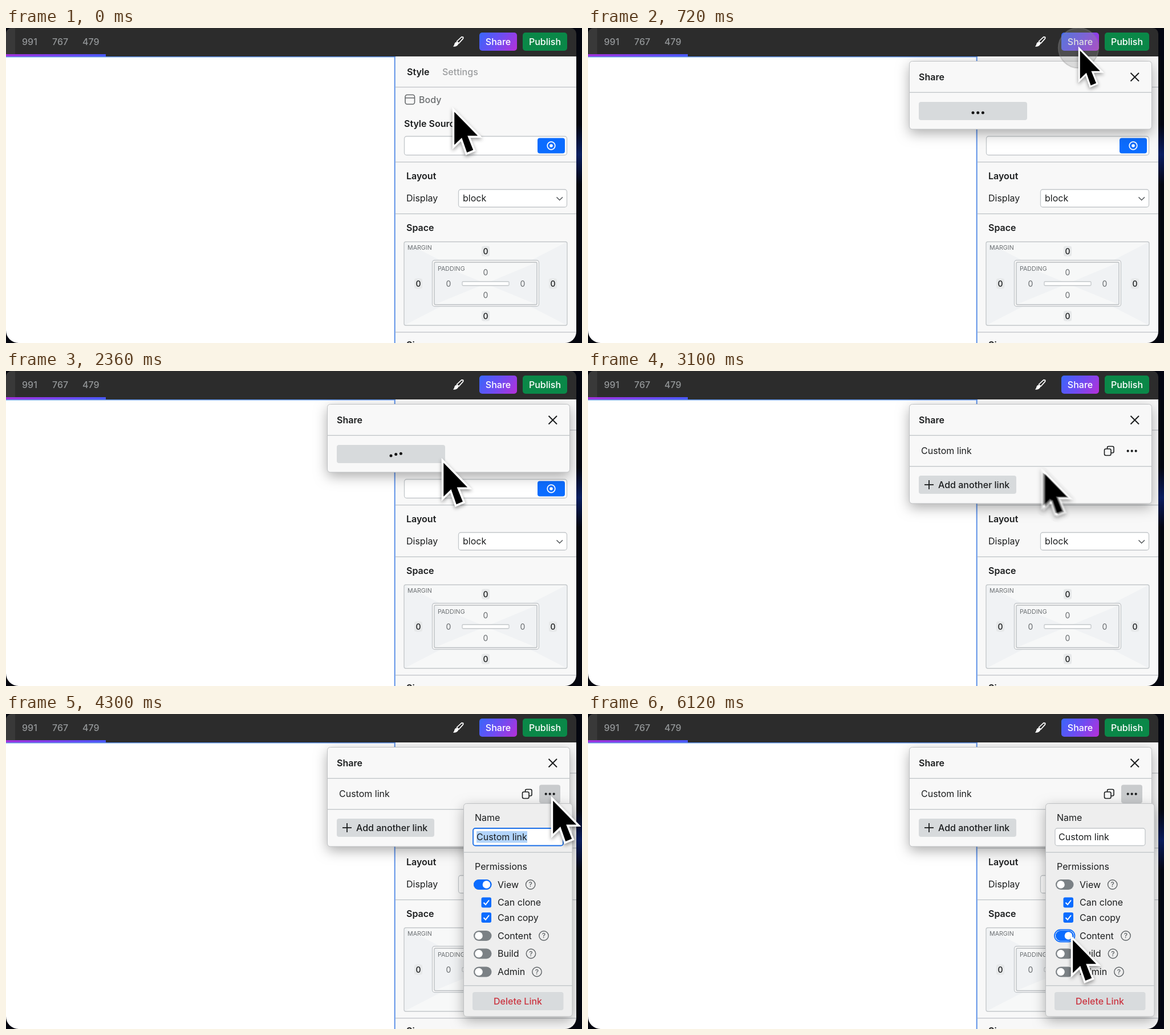
An HTML page with a canvas for the animation above (6.46 s loop, 1010 by 554 pixels).

```html
<!DOCTYPE html>
<html lang="en">
<head>
<meta charset="utf-8">
<title>Share link</title>
<style>
html, body { margin: 0; width: 100%; height: 100%; overflow: hidden; background: #04060f; }
canvas { display: block; width: 1010px; height: 554px; }
</style>
</head>
<body>
<canvas id="stage" width="1010" height="554"></canvas>
<script>
const LOOP = 6460;
const ctx = document.getElementById('stage').getContext('2d');
const layer = document.createElement('canvas');
layer.width = 1010;
layer.height = 554;
const lctx = layer.getContext('2d');

const INK = '#1b1d1e', LINE = '#c3c7ca', BLUE = '#0b6cff', PANEL = '#f8f8f8', BUTTON = '#d7dadc';

const clamp = v => Math.max(0, Math.min(1, v));
const smooth = v => v * v * (3 - 2 * v);
const mix = (a, b, k) => a + (b - a) * k;

// ---------- drawing helpers ----------
function box(x, y, x2, y2, r, fill, stroke, width = 1.3) {
  ctx.beginPath();
  ctx.roundRect(x, y, x2 - x, y2 - y, r);
  if (fill) { ctx.fillStyle = fill; ctx.fill(); }
  if (stroke) { ctx.strokeStyle = stroke; ctx.lineWidth = width; ctx.stroke(); }
}

function rule(x, x2, y) {
  ctx.fillStyle = LINE;
  ctx.fillRect(x, y - 0.7, x2 - x, 1.4);
}

function text(s, x, cy, { color = INK, weight = 400, size = 16, align = 'left' } = {}) {
  ctx.font = `${weight} ${size}px Inter, sans-serif`;
  ctx.textAlign = align;
  ctx.fillStyle = color;
  ctx.fillText(s, x, cy + size * 0.364);
}

function disc(x, y, r, color) {
  ctx.fillStyle = color;
  ctx.beginPath();
  ctx.arc(x, y, r, 0, 7);
  ctx.fill();
}

function ring(x, y, r, color, width) {
  ctx.strokeStyle = color;
  ctx.lineWidth = width;
  ctx.beginPath();
  ctx.arc(x, y, r, 0, 7);
  ctx.stroke();
}

function line(color, width, ...pts) {
  ctx.strokeStyle = color;
  ctx.lineWidth = width;
  ctx.beginPath();
  for (let i = 0; i < pts.length; i += 2) ctx.lineTo(pts[i], pts[i + 1]);
  ctx.stroke();
}

function ramp(x, y, x2, y2, ...colors) {
  const g = ctx.createLinearGradient(x, y, x2, y2);
  colors.forEach((c, i) => g.addColorStop(i / (colors.length - 1), c));
  return g;
}

function card(x, y, x2, y2, fill) {
  ctx.save();
  ctx.shadowColor = 'rgba(0,0,0,.32)';
  ctx.shadowBlur = 22;
  ctx.shadowOffsetY = 7;
  box(x, y, x2, y2, 5, fill);
  ctx.restore();
  box(x, y, x2, y2, 5, null, '#bfc1c3', 1);
}

function plus(x, y) {
  line(INK, 1.8, x - 8, y, x + 8, y);
  line(INK, 1.8, x, y - 8, x, y + 8);
}

// ---------- editor ----------
function topBar() {
  ctx.fillStyle = '#2c2c2c';
  ctx.fillRect(0, 0, 1000, 50);
  ctx.fillStyle = '#393939';
  ctx.fillRect(0, 0, 16, 46);
  const soft = { color: '#929597', weight: 500 };
  text('991', 28, 24, soft);
  text('767', 81, 24, soft);
  text('479', 134, 24, soft);
  ctx.fillStyle = ramp(0, 0, 175, 0, '#a033dc', '#7a42ee', '#4a58fa');
  ctx.fillRect(0, 46, 175, 4.5);

  // brush
  ctx.lineJoin = ctx.lineCap = 'round';
  line('#fff', 1.7, 790.5, 23.5, 799, 15.6, 801.6, 16, 801.6, 18.4, 794, 27, 790.5, 23.5);
  ctx.fillStyle = '#fff';
  ctx.beginPath();
  ctx.moveTo(789.5, 24.5);
  ctx.quadraticCurveTo(794, 25.5, 793, 29);
  ctx.quadraticCurveTo(790, 33.5, 784, 32.5);
  ctx.quadraticCurveTo(786.5, 30.5, 786.3, 28);
  ctx.quadraticCurveTo(787, 25, 789.5, 24.5);
  ctx.fill();
  ctx.lineJoin = 'miter';
  ctx.lineCap = 'butt';

  box(830, 8, 896, 40, 5, ramp(834, 4, 892, 44, '#3a66fb', '#6f4cf2', '#b430d8'));
  text('Share', 863, 24, { color: '#fff', weight: 500, align: 'center' });
  box(906, 8, 984, 40, 5, '#0a8848');
  text('Publish', 945, 24, { color: '#fff', weight: 500, align: 'center' });
}

function wedges(x, y, x2, y2, cx, cy) {
  ctx.fillStyle = '#f0f2f4';
  for (const side of [x, x2]) {
    ctx.beginPath();
    ctx.moveTo(side, y);
    ctx.lineTo(cx, cy);
    ctx.lineTo(side, y2);
    ctx.fill();
  }
}

function spaceBox() {
  box(698, 376, 984, 523, 3, '#f7f8f8');
  wedges(698, 376, 984, 523, 841, 449.5);
  box(698, 376, 984, 523, 3, null, LINE);
  box(747.5, 408.5, 934.5, 489.5, 4, PANEL, LINE);
  box(751, 412, 931, 486.5, 2, '#f7f8f8');
  wedges(751, 412, 931, 486.5, 841, 449.5);
  box(751, 412, 931, 486.5, 2, null, '#b9bdc0');
  box(800, 446, 882, 453, 1.5, '#fff', LINE);
  const tag = { color: '#6b6f72', size: 10.67 };
  text('MARGIN', 704, 386, tag);
  text('PADDING', 757, 423, tag);
  for (const [x, y] of [[841, 392.5], [723, 449.5], [959, 449.5], [841, 506.5]]) {
    box(x - 7, y - 9, x + 7, y + 9, 3, '#e6e8e9');
    text('0', x, y, { size: 14, weight: 500, align: 'center' });
  }
  for (const [x, y] of [[841, 429.5], [776, 449.5], [906, 449.5], [841, 469.5]])
    text('0', x, y, { size: 14, color: '#666a6d', align: 'center' });
}

function editor() {
  ctx.fillStyle = '#fff';
  ctx.fillRect(0, 50, 683, 504);
  ctx.fillStyle = PANEL;
  ctx.fillRect(683, 50, 317, 504);
  topBar();
  ctx.fillStyle = '#5c90e6';
  ctx.fillRect(0, 50, 683, 1.5);
  ctx.fillRect(680.7, 50, 2, 504);

  const bold = { weight: 600 };
  text('Style', 703, 77, bold);
  text('Settings', 765, 77, { color: '#9b9d9f', weight: 500 });
  for (const y of [104, 235.7, 326.7, 535]) rule(683, 1000, y);

  box(700, 117.5, 716.5, 134, 3.5, null, '#66696b', 1.6);
  line('#66696b', 1.6, 700, 123, 716.5, 123);
  text('Body', 724, 126, { color: '#6b6e70', weight: 500 });

  text('Style Sources', 698, 168, bold);
  box(698.5, 190.5, 983.5, 223.5, 4, '#fff', LINE);
  box(932, 193.5, 980, 220.5, 4, BLUE);
  ring(956, 207, 6.8, '#fff', 1.7);
  disc(956, 207, 2.8, '#fff');

  text('Layout', 702, 260, bold);
  text('Display', 702, 299.5);
  box(793.5, 284, 983.5, 315, 4, '#fff', LINE);
  text('block', 801, 299.5);
  line('#55595c', 1.6, 965.5, 297.5, 970.7, 302.7, 976, 297.5);

  text('Space', 702, 351, bold);
  spaceBox();
  text('Size', 702, 557, bold);
}

// ---------- popovers ----------
function loadingDots(dt) {
  for (let i = 0; i < 3; i++) {
    const p = ((dt - i * 100) % 600) / 200;
    const lift = p > 0 && p < 1 ? 4.5 * Math.sin(Math.PI * p) : 0;
    disc(675 + i * 8.7, 149 - lift, 2.5, '#111');
  }
}

function shareCard(t) {
  const listed = t >= 2660;
  card(563.5, 58.5, 988.5, listed ? 233 : 178, PANEL);
  text('Share', 580, 86, { weight: 600 });
  line(INK, 1.9, 951.5, 79, 966, 93.5);
  line(INK, 1.9, 966, 79, 951.5, 93.5);
  rule(564, 988, 113.3);

  if (!listed) {
    box(580, 130, 770, 162, 4, BUTTON);
    if (t < 1280) loadingDots(t - 720);
    else if (t >= 2100) loadingDots(t - 2100);
    else {
      plus(598, 146);
      text('Share a custom link', 614, 146, { weight: 500 });
    }
    return;
  }
  text('Custom link', 584, 140.5);
  if (t >= 3620) box(935, 124.5, 972, 157, 4, '#c9cbcd');
  box(910.5, 132.5, 922, 144, 2.5, null, INK, 1.6);
  box(905.5, 137, 917, 148.5, 2.5, t >= 2660 ? PANEL : null, INK, 1.6);
  for (const x of [946.7, 953.7, 960.7]) disc(x, 140.7, 2.1, INK);
  rule(564, 988, 167.7);
  box(580, 184, 751, 216, 4, BUTTON);
  plus(598, 200);
  text('Add another link', 614, 200, { weight: 500 });
}

function toggle(cy, k, focused) {
  if (focused) box(818, cy - 10.5, 853.5, cy + 10.5, 10.5, '#fff', BLUE, 1.8);
  box(820, cy - 9, 851.5, cy + 9, 9, '#7b8185');
  ctx.globalAlpha = k;
  box(820, cy - 9, 851.5, cy + 9, 9, BLUE);
  ctx.globalAlpha = 1;
  disc(mix(829, 842.5, k), cy, 6.8, '#fff');
}

function help(x, y) {
  ring(x, y, 8.2, '#5d6265', 1.4);
  text('?', x, y, { size: 12, weight: 500, color: '#5d6265', align: 'center' });
}

function checkbox(cy) {
  box(833.5, cy - 9, 851, cy + 9, 3, BLUE);
  line('#fff', 2, 837.5, cy + 0.3, 841, cy + 3.8, 847, cy - 4);
}

function linkCard(t) {
  const focus = t < 5290;
  const k = smooth(clamp((t - 5400) / 160));
  card(802.5, 157.5, 993, 532, '#eeeeee');
  text('Name', 822, 182);
  box(819, 201, 977, 231.5, 4, '#fff', focus ? '#1a6fe8' : LINE, focus ? 1.8 : 1.3);
  if (focus) {
    ctx.fillStyle = '#b2d4fa';
    ctx.fillRect(825, 206, 89, 20.5);
  }
  text('Custom link', 825, 216.5);
  rule(803, 993, 243.3);
  text('Permissions', 822, 268);

  toggle(300, 1 - k, false);
  toggle(390, k, !focus);
  toggle(421.5, 0, false);
  toggle(453.5, 0, false);
  checkbox(331.5);
  checkbox(358);
  text('View', 862, 300);
  text('Can clone', 862, 331.5);
  text('Can copy', 862, 358);
  text('Content', 862, 390);
  text('Build', 862, 421.5);
  text('Admin', 862, 453.5);
  help(919.7, 300);
  help(943, 390);
  help(920.5, 421.5);
  help(931, 453.5);

  rule(803, 993, 477.7);
  box(818, 489, 977.5, 521, 4, '#d8dbdd');
  text('Delete Link', 897.5, 505, { color: '#cb3440', weight: 500, align: 'center' });
}

// ---------- pointer ----------
// start time, end point, control point
const START = [783, 142];
const MOVES = [
  { at: 20, to: [860, 35], via: [835, 98] },
  { at: 1420, to: [764, 156], via: [822, 112] },
  { at: 3000, to: [956, 147], via: [898, 240] },
  { at: 4620, to: [847, 392], via: [956, 271] }
];
const CLICKS = [680, 2080, 3660, 5280];

function pointerAt(t) {
  let from = START;
  for (const { at, to, via } of MOVES) {
    if (t <= at) break;
    const p = clamp((t - at) / 640);
    if (p < 1) {
      const u = mix(p, smooth(p), 0.35), v = 1 - u;
      return [0, 1].map(i => v * v * from[i] + 2 * u * v * via[i] + u * u * to[i]);
    }
    from = to;
  }
  return from;
}

function sinceClick(t) {
  return t - Math.max(-1e4, ...CLICKS.filter(c => c <= t));
}

function ripple(t) {
  const p = sinceClick(t) / 250;
  if (p >= 1) return;
  const [x, y] = pointerAt(t);
  ctx.globalAlpha = 1 - p;
  disc(x, y, 30 + 32 * p, 'rgba(150,150,150,.38)');
  ring(x, y, 30 + 32 * p, 'rgba(140,140,140,.4)', 2);
  ctx.globalAlpha = 1;
}

const arrow = new Path2D('M0 0V58L13 45.5L22 71.5L33 67L23 42H41Z');

function drawArrow(c, x, y, s) {
  c.save();
  c.translate(x, y);
  c.scale(s, s);
  c.translate(3.2, 5.5);
  c.lineWidth = 7;
  c.strokeStyle = '#fff';
  c.miterLimit = 3;
  c.shadowColor = 'rgba(0,0,0,.4)';
  c.shadowBlur = 6;
  c.shadowOffsetY = 3;
  c.stroke(arrow);
  c.shadowColor = 'transparent';
  c.fillStyle = '#000';
  c.fill(arrow);
  c.restore();
}

function pointer(t) {
  const dt = sinceClick(t);
  const s = 1 - 0.28 * Math.exp(-dt / 120) * Math.sin(Math.PI * dt / 160);
  const moving = MOVES.some(m => t > m.at && t < m.at + 640);
  if (!moving) {
    drawArrow(ctx, ...pointerAt(t), s);
    return;
  }
  // motion blur: average several poses around now
  const n = 8;
  ctx.save();
  lctx.clearRect(0, 0, 1010, 554);
  lctx.globalCompositeOperation = 'lighter';
  for (let i = 0; i < n; i++) {
    const [x, y] = pointerAt(t + (i / (n - 1) - 0.5) * 16);
    scratch.clearRect(0, 0, 1010, 554);
    drawArrow(scratch, x, y, s);
    lctx.globalAlpha = 1 / n;
    lctx.drawImage(scratch.canvas, 0, 0);
  }
  ctx.drawImage(layer, 0, 0);
  ctx.restore();
}

const scratch = layer.cloneNode().getContext('2d');

// ---------- frame ----------
function backdrop() {
  ctx.fillStyle = '#04060f';
  ctx.fillRect(0, 0, 1010, 554);
  ctx.fillStyle = ramp(0, 170, 0, 275, 'rgba(10,30,95,0)', 'rgba(10,30,95,1)', 'rgba(10,30,95,0)');
  ctx.fillRect(1000, 170, 10, 105);
}

function draw(t) {
  backdrop();
  ctx.save();
  ctx.beginPath();
  ctx.roundRect(0, 0, 1000, 554, [10, 10, 20, 22]);
  ctx.clip();
  editor();
  ctx.restore();
  if (t >= 690) shareCard(t);
  if (t >= 3700) linkCard(t);
  ripple(t);
  pointer(t);
}

function tick() {
  draw(performance.now() % LOOP);
  requestAnimationFrame(tick);
}
tick();
</script>
</body>
</html>
```
